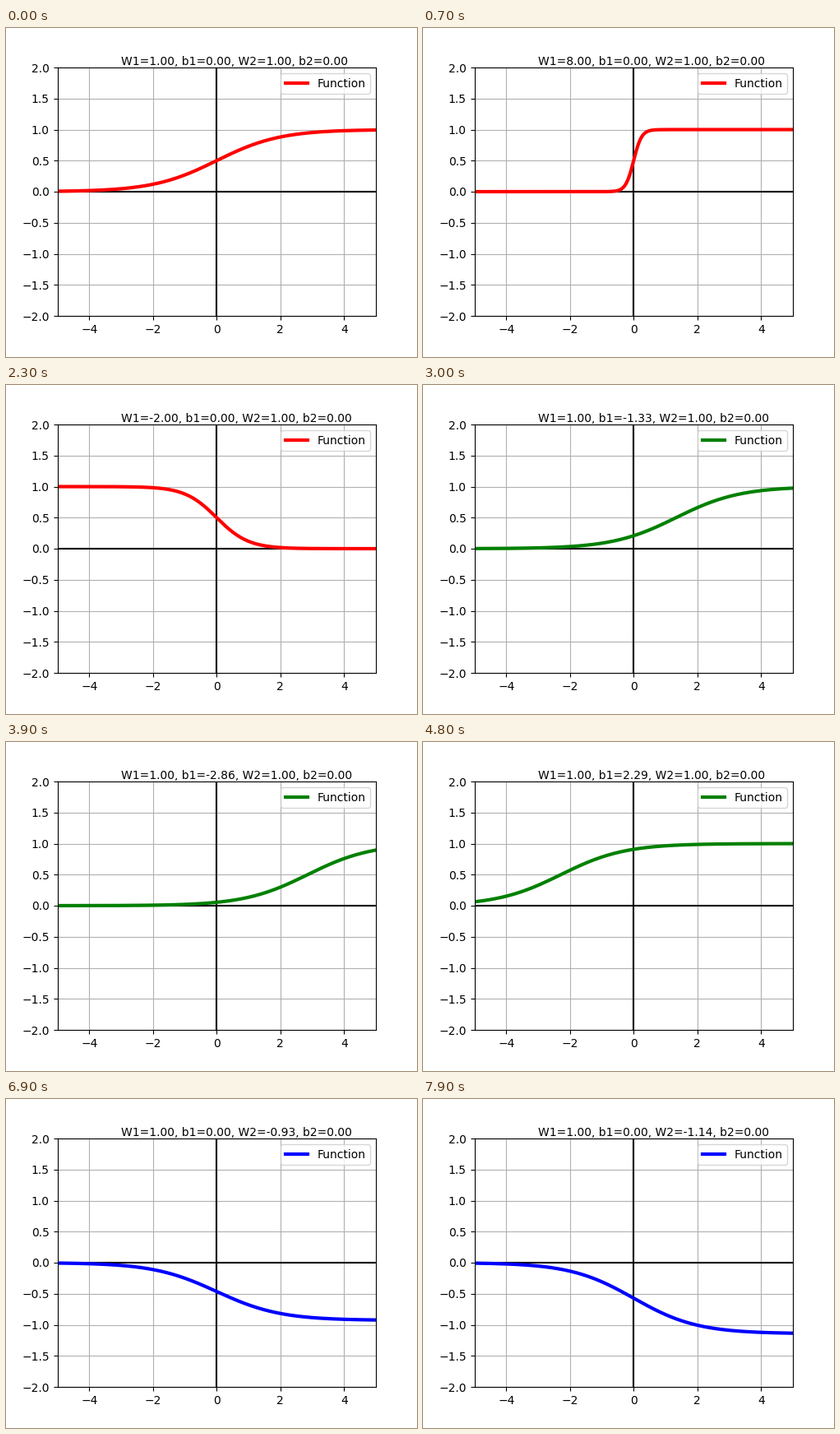
Recreate the animation shown at these times as a matplotlib script. Size 500 px wide and 400 px high, loop 8 s.

```python
import numpy as np
import matplotlib.pyplot as plt
from matplotlib.animation import FuncAnimation

FRAMES = 80
DEFAULTS = {"W1": 1.0, "b1": 0.0, "W2": 1.0, "b2": 0.0}

# Each sweep: parameter, line colour, legs as (start, end, steps)
SWEEPS = [
    ("W1", "red", [(1, 10, 10), (10, -5, 10), (-5, 1, 7)]),
    ("b1", "green", [(0, -4, 10), (-4, 4, 15), (4, 0, 8)]),
    ("W2", "blue", [(1, -2, 15), (-2, 1, 15)]),
]


def build_states():
    states = []
    for name, color, legs in SWEEPS:
        for start, end, steps in legs:
            for value in np.linspace(start, end, steps):
                states.append((color, {**DEFAULTS, name: value}))
    return states[:FRAMES]


def network(x, p):
    return p["W2"] / (1 + np.exp(-(p["W1"] * x + p["b1"]))) + p["b2"]


states = build_states()
x = np.linspace(-5, 5, 200)

fig, ax = plt.subplots(figsize=(5, 4), dpi=100)
fig.subplots_adjust(left=0.125, right=0.9, bottom=0.125, top=0.88)
ax.set_xlim(-5, 5)
ax.set_ylim(-2, 2)
ax.set_xticks(range(-4, 5, 2))
ax.set_yticks(np.arange(-2, 2.1, 0.5))
ax.grid(True)
ax.axhline(0, color="black")
ax.axvline(0, color="black")

curve, = ax.plot(x, network(x, DEFAULTS), color="red", lw=3, label="Function")
caption = ax.text(-3, 2, "", va="bottom")
legend = ax.legend(loc="upper right")
handle = legend.get_lines()[0]


def update(frame):
    color, params = states[frame]
    curve.set_ydata(network(x, params))
    curve.set_color(color)
    handle.set_color(color)
    caption.set_text(", ".join(f"{k}={v + 0.0:.2f}" for k, v in params.items()))
    return curve, handle, caption


anim = FuncAnimation(fig, update, frames=FRAMES, interval=100, repeat=True)
plt.show()
```
